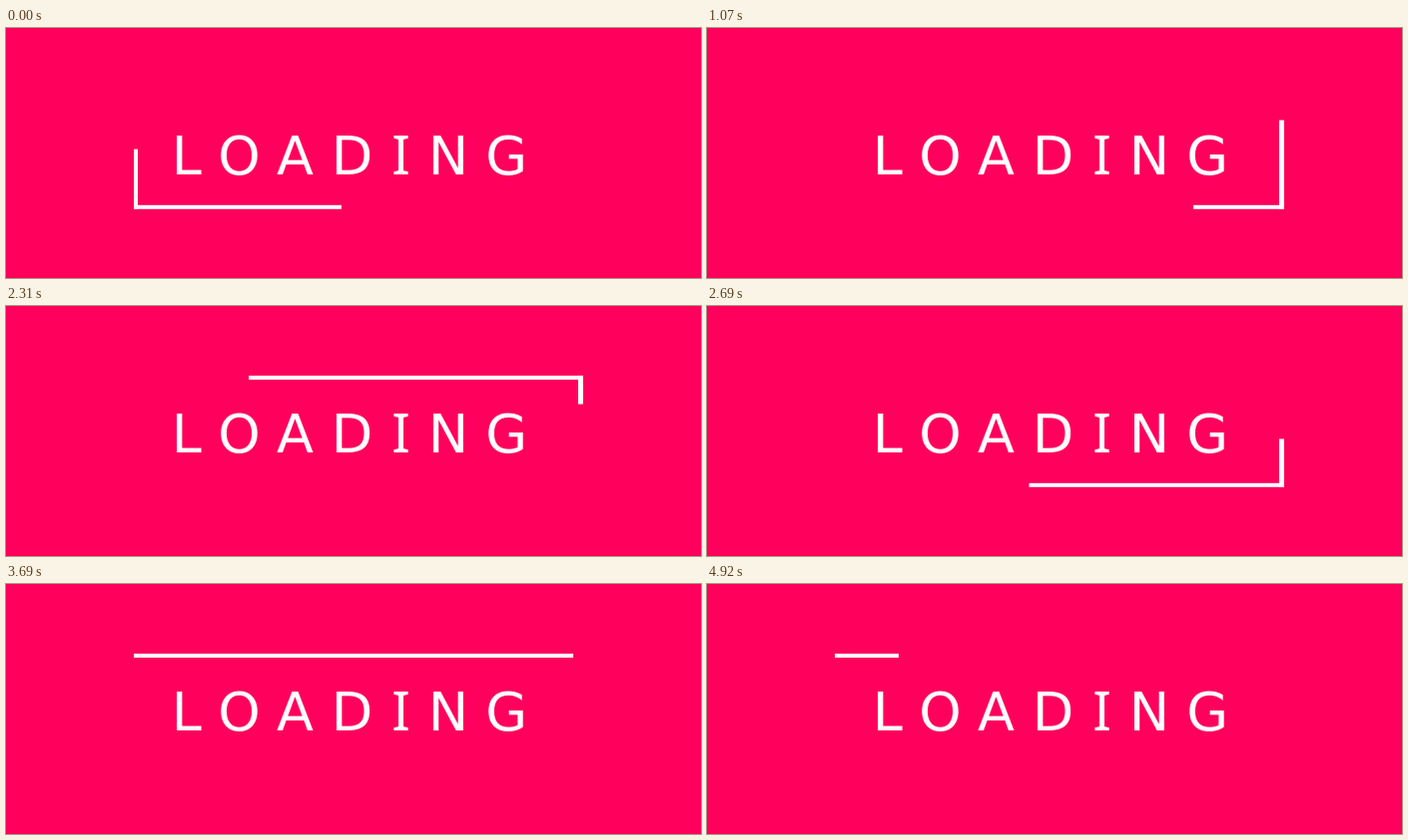
Animation, 696 px wide and 251 px high, one loop 5 s. Source, as an HTML page:

```html
<!DOCTYPE html>
<html lang="en">
<head>
<meta charset="utf-8">
<title>Loading</title>
<style>
  html, body { margin: 0; width: 100%; height: 100%; overflow: hidden; background: #ff005c; }
  svg { display: block; fill: #fff; }
  text { font: 54px "DejaVu Sans", sans-serif; }
  .slab { font: 55px "Noto Sans", sans-serif; text-anchor: middle; }
</style>
</head>
<body>
<svg width="696" height="251" viewBox="0 0 696 251">
  <text y="147.2" x="165.8 212.3 271 325.8">LOAD</text>
  <text y="147.2" x="395.5" class="slab">I</text>
  <text y="147.2" x="422.8 480.3">NG</text>
  <rect/><rect/><rect/><rect/>
</svg>
<script>
const LOOP = 5000, STEP = 76.9, LAST_STEP = 64;
const LEFT = 128, TOP = 69.9, RIGHT = 578, BOTTOM = 181.8;
const WIDTH = RIGHT - LEFT, HEIGHT = BOTTOM - TOP;
const THICK = 4, RIGHT_THICK = 5;
const bars = document.querySelectorAll('rect');

// Key points [step, progress] of a nearly even pace; five units make one lap.
const keys = [[0, 3.538], [14, 7.202], [30, 11.256], [48, 15.978], [LAST_STEP, 20.142]];

const clamp = v => Math.min(1, Math.max(0, v));

function progressAt(time) {
  const step = Math.min(LAST_STEP, Math.floor(time / STEP + 0.1));
  const next = Math.max(1, keys.findIndex(([s]) => s >= step));
  const [s0, p0] = keys[next - 1], [s1, p1] = keys[next];
  return p0 + (p1 - p0) * (step - s0) / (s1 - s0);
}

function setBar(bar, x, y, width, height) {
  Object.entries({ x, y, width, height }).forEach(([name, v]) => bar.setAttribute(name, v));
}

// The line runs clockwise from the top left corner, its tail one side behind.
function draw(time) {
  const head = progressAt(time) % 5, tail = head - 1;
  const span = side => [clamp(tail - side), clamp(head - side)];
  const [top, right, bottom, left] = [0, 1, 2, 3].map(span);
  const length = ([from, to]) => to - from;
  setBar(bars[0], LEFT + WIDTH * top[0], TOP, WIDTH * length(top), THICK);
  setBar(bars[1], RIGHT - RIGHT_THICK, TOP + HEIGHT * right[0], RIGHT_THICK, HEIGHT * length(right));
  setBar(bars[2], RIGHT - WIDTH * bottom[1], BOTTOM - THICK, WIDTH * length(bottom), THICK);
  setBar(bars[3], LEFT, BOTTOM - HEIGHT * left[1], THICK, HEIGHT * length(left));
}

const start = performance.now();
function tick() {
  draw((performance.now() - start) % LOOP);
  requestAnimationFrame(tick);
}
tick();
</script>
</body>
</html>
```
